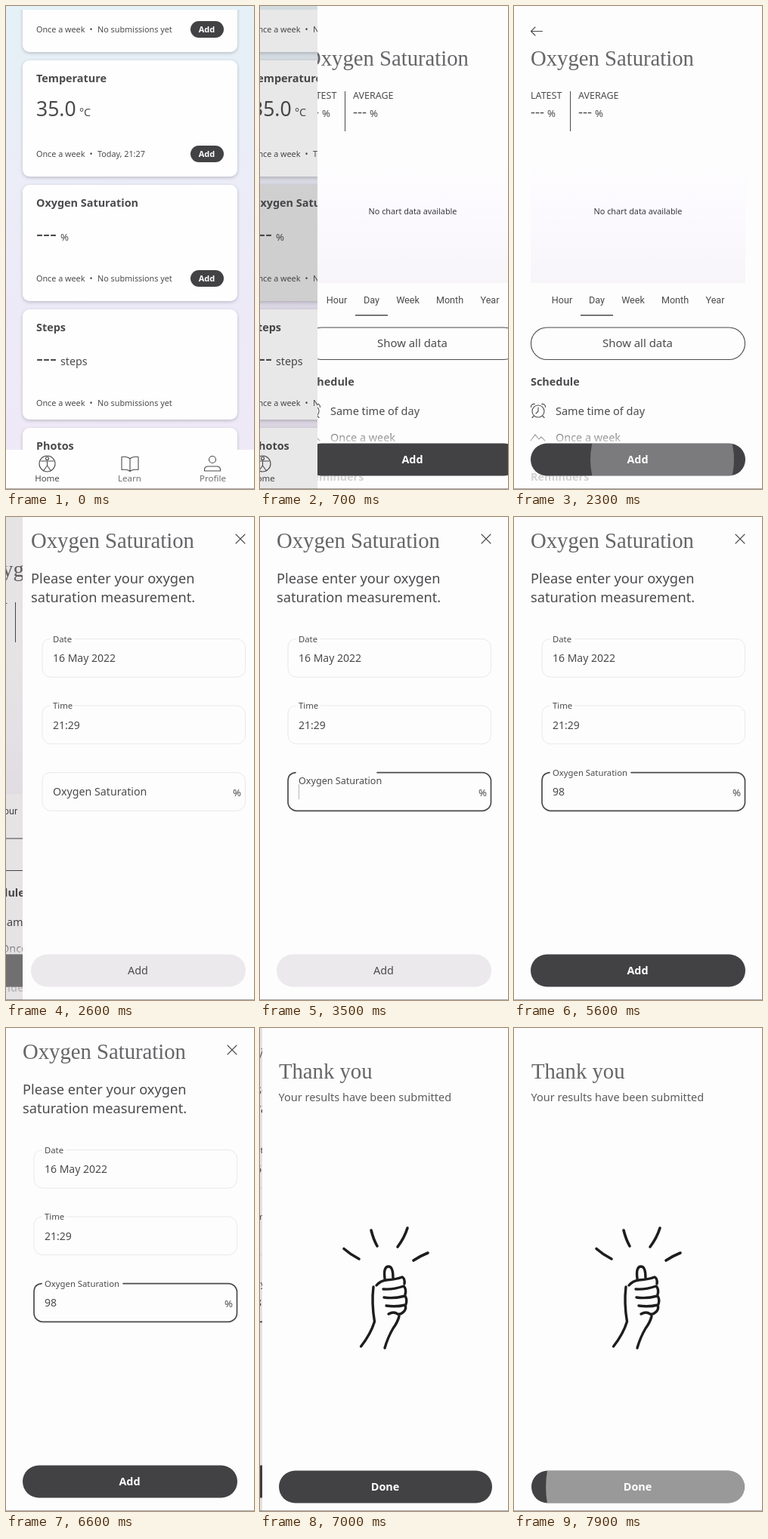
Animation of 328x640 px, one loop 8 s. Source, as an HTML page with a canvas:

```html
<!DOCTYPE html>
<html lang="en">
<head>
<meta charset="utf-8">
<title>Oxygen saturation entry</title>
<style>
  html, body { margin: 0; width: 100%; height: 100%; overflow: hidden; background: #fff; }
  canvas { display: block; width: 100vw; height: 100vh; }
</style>
</head>
<body>
<canvas></canvas>
<script>
const W = 328, H = 640, LOOP = 8000, STEP = 100;
const INK = '#4b4b4e', DARK = '#424245', TITLE = '#666568', PAGE = '#fdfdfd';
const SANS = '"Noto Sans", sans-serif', SERIF = '"Liberation Serif", serif', ROBOTO = 'Roboto, sans-serif';
const canvas = document.querySelector('canvas');
const ctx = canvas.getContext('2d');
const scale = window.devicePixelRatio || 1;
canvas.width = W * scale;
canvas.height = H * scale;

const clamp = v => Math.min(1, Math.max(0, v));
const easeOut = v => 1 - (1 - clamp(v)) ** 3;
const progress = (t, start, length) => clamp((t - start) / length);

function text(str, x, y, size, { color = INK, weight = 400, font = SANS, align = 'left' } = {}) {
  ctx.font = `${weight} ${size}px ${font}`;
  ctx.fillStyle = color;
  ctx.textAlign = align;
  ctx.fillText(str, x, y);
}

const title = (str, x, y) => text(str, x, y, 28.7, { font: SERIF, color: TITLE });

function rect(x, y, w, h, fill) {
  ctx.fillStyle = fill;
  ctx.fillRect(x, y, w, h);
}

function roundRect(x, y, w, h, r) {
  ctx.beginPath();
  ctx.roundRect(x, y, w, h, r);
}

function fillRound(x, y, w, h, r, fill) {
  roundRect(x, y, w, h, r);
  ctx.fillStyle = fill;
  ctx.fill();
}

function stroke(d, width = 1.1, color = INK) {
  ctx.lineWidth = width;
  ctx.strokeStyle = color;
  ctx.lineCap = ctx.lineJoin = 'round';
  ctx.stroke(new Path2D(d));
}

function gradient(y0, y1, ...colors) {
  const g = ctx.createLinearGradient(0, y0, 0, y1);
  colors.forEach((c, i) => g.addColorStop(i / (colors.length - 1), c));
  return g;
}

function scoped(draw) {
  ctx.save();
  draw();
  ctx.restore();
}

function button(x, y, w, h, label, ripple, { fill = DARK, color = '#fff', weight = 600 } = {}) {
  fillRound(x, y, w, h, h / 2, fill);
  if (ripple.r > 0 && ripple.alpha > 0) scoped(() => {
    roundRect(x, y, w, h, h / 2);
    ctx.clip();
    ctx.beginPath();
    ctx.arc(ripple.x, y + h / 2, ripple.r, 0, 7);
    ctx.fillStyle = `rgba(255,255,255,${ripple.alpha})`;
    ctx.fill();
  });
  text(label, 163.5, y + h / 2 + 4.9, 14.4, { color, weight, align: 'center' });
}

// Home list

function card(top, height, name, value, unit, note, canAdd, pressed) {
  scoped(() => {
    ctx.shadowColor = 'rgba(60,55,70,.28)';
    ctx.shadowBlur = 4 * scale;
    ctx.shadowOffsetY = 1.5 * scale;
    fillRound(22, top, 284, height, 9, '#fefefe');
  });
  if (pressed) fillRound(22, top, 284, height, 9, 'rgba(0,0,0,.11)');
  text(name, 40, top + 29, 14.4, { weight: 600 });
  if (!note) return;
  const isEmpty = value === '---';
  text(value, 40, top + 73.5, isEmpty ? 28 : 26.5, { weight: isEmpty ? 500 : 400 });
  text(unit, isEmpty ? 72 : 97, top + 73.5, unit === '%' ? 13.2 : 14.3);
  text('Once a week', 40, top + 128, 10.8);
  text('•', 112.5, top + 128, 10.8, { align: 'center' });
  text(note, 121, top + 128, 10.8);
  if (canAdd) {
    fillRound(244, top + 113, 44, 22, 11, DARK);
    text('Add', 265.5, top + 128, 11, { color: '#fff', weight: 600, align: 'center' });
  }
}

function home(t) {
  const none = 'No submissions yet';
  rect(0, 0, W, H, gradient(0, 590, '#e4f1f6', '#eaedf7', '#edeaf8', '#efe9f7'));
  scoped(() => {
    ctx.beginPath();
    ctx.rect(0, 5, W, H);
    ctx.clip();
    card(-93, 154, '', '', '', none, true);
  });
  card(72, 154, 'Temperature', '35.0', '°C', 'Today, 21:27', true);
  card(237, 154, 'Oxygen Saturation', '---', '%', none, true, t >= 500);
  card(402, 146, 'Steps', '---', 'steps', none, false);
  card(559, 146, 'Photos');
  rect(0, 588, W, 52, '#fefefe');
  stroke('M65 606.5a10.5 10.5 0 1 1-21 0a10.5 10.5 0 1 1 21 0M46 603h17M54.5 603v6l-5 7M54.5 609l5 7M52.5 599.5a2 2 0 1 1 4 0a2 2 0 1 1-4 0');
  stroke('M164 600c-3-3-7-3-11-2.500v17c4-.5 8-.5 11 2c3-2.500 7-2.500 11-2v-17c-4-.5-8-.5-11 2.500v16');
  stroke('M277.500 601a4.500 4.500 0 1 1-9 0a4.500 4.500 0 1 1 9 0M262.500 616v-1.500c0-3 2-4.500 5-4.500h11c3 0 5 1.500 5 4.500v1.500z');
  [['Home', 54.5], ['Learn', 163.5], ['Profile', 273.5]].forEach(([label, x], i) =>
    text(label, x, 630, 11.5, { align: 'center', color: i ? '#707073' : INK }));
}

// Measurement details

function detail(t) {
  rect(0, 0, W, H, PAGE);
  stroke('M37.500 33.500H22.500M28 28l-5.500 5.500l5.500 5.500');
  title('Oxygen Saturation', 22, 79);
  [['LATEST', 22], ['AVERAGE', 85]].forEach(([label, x]) => {
    text(label, x, 123, 12.5);
    text('---', x, 147, 18.6, { weight: 500 });
    text('%', x + 22, 147, 13.2);
  });
  rect(74, 113, 1, 53, INK);
  rect(22, 195, 284, 172, gradient(195, 367, '#fefdfd', '#fbf9fe', '#f8f5f9'));
  text('No chart data available', 164, 276, 10.8, { align: 'center', color: '#38383b' });
  [['Hour', 63.5], ['Day', 109.5], ['Week', 157.5], ['Month', 213], ['Year', 266]].forEach(([label, x]) =>
    text(label, x, 394, 12.6, { font: ROBOTO, align: 'center' }));
  rect(88, 409, 43, 1.5, INK);
  roundRect(22.5, 426, 283, 42.5, 21.2);
  ctx.lineWidth = 1.1;
  ctx.strokeStyle = INK;
  ctx.stroke();
  text('Show all data', 163.5, 452, 14.9, { align: 'center' });
  text('Schedule', 22, 503, 14.4, { weight: 600 });
  stroke('M40 537a8 8 0 1 1-16 0a8 8 0 1 1 16 0M32 532v5l-3 3M22.500 531.500c0-3 2-4.500 5-4M41.500 531.500c0-3-2-4.500-5-4M26 543.500l-2 2M38 543.500l2 2');
  text('Same time of day', 55, 542, 14.5);
  stroke('M22 576l6-8l5 6l3-3l5 5');
  text('Once a week', 55, 577, 14.4);
  text('Reminders', 22, 629, 14.4, { weight: 600 });
  rect(0, 560, W, 80, gradient(560, 580, 'rgba(253,253,253,0)', 'rgba(253,253,253,.76)'));
  button(22, 579.5, 284, 43, 'Add', { x: 196, r: t - 2205, alpha: .3 });
}

// Entry form

function field(top, label, value, { focused = false, float = 1, gap = 80 } = {}) {
  const bottom = top + 50.7, color = focused ? INK : '#ebe9eb';
  const start = float ? gap : 48;
  stroke(`M${start} ${top}H294a11.500 11.500 0 0 1 11.500 11.500V${bottom - 11.5}a11.500 11.500 0 0 1-11.500 11.500H48.500a11.500 11.500 0 0 1-11.500-11.500V${top + 11.5}q0-10.500 10-11.500`, focused ? 1.7 : 1, color);
  text(label, 51, top + 30 - 26 * float, 14.2 - 2.9 * float);
  text(value, 51, top + 30.5, 14);
}

function key(col, row, label, pressed) {
  const x = 4 + col * 81, y = 455 + row * 46;
  const isAction = col === 3, isDone = isAction && row === 3;
  fillRound(x, y + 1, 77, 40, 5, '#c3c2c9');
  fillRound(x, y, 77, 40, 5, isDone ? '#2374e1' : isAction ? '#cbcad2' : pressed ? '#e5e3e5' : '#fefefe');
  if (label) text(label, x + 38.5, y + 30, 27, { font: ROBOTO, align: 'center', color: '#1d1d20' });
}

function keyboard(t) {
  const shown = easeOut(progress(t, 3500, 400)) * (1 - progress(t, 5330, 270));
  if (!shown) return;
  ctx.translate(0, 191 * (1 - shown));
  rect(0, 449, W, 191, '#e9e8ee');
  const pressed = t === 4500 ? '9' : t === 4900 ? '8' : null;
  ['123', '456', '789', ',0.'].forEach((labels, row) => {
    [...labels].forEach((label, col) => key(col, row, label, label === pressed));
    key(3, row);
  });
  stroke('M281 475.500h9', 1.8, '#3b3b40');
  stroke('M276.500 520v4h18v-4', 1.6, '#3b3b40');
  stroke('M274.500 568l6-8h15v16h-15zM284 564.500l7 7M291 564.500l-7 7', 1.6, '#3b3b40');
  stroke('M278.500 614l4.500 4.500l10-10', 1.8, '#fff');
}

function form(t) {
  const focused = t >= 3500;
  const value = t >= 5000 ? '98' : t >= 4600 ? '9' : '';
  rect(0, 0, W, H, PAGE);
  title('Oxygen Saturation', 22, 41);
  stroke('M293 23l12 12M305 23l-12 12');
  text('Please enter your oxygen', 22, 88, 18.2);
  text('saturation measurement.', 22, 113, 18.2);
  field(161.5, 'Date', '16 May 2022');
  field(250, 'Time', '21:29');
  field(338.6, 'Oxygen Saturation', value, { focused, gap: 155, float: focused ? progress(t, 3395, 190) : 0 });
  text('%', 289, 370, 13.2);
  const caretOn = focused && t < 5500 || t >= 6000 && t < 6500;
  if (caretOn) rect(51 + value.length * 7.8, 354, 1, 20, '#b8b6b9');
  if (value) {
    button(22, 579.5, 284, 43, 'Add', { x: 170, r: t - 6105, alpha: .35 * (1 - progress(t, 6350, 250)) });
  } else {
    button(22, 579.5, 284, 43, 'Add', {}, { fill: '#ebe9eb', color: INK, weight: 500 });
  }
  rect(0, 639, W, 1, '#a9a8aa');
  scoped(() => keyboard(t));
}

// Confirmation

function thanks(t) {
  rect(0, 0, W, H, PAGE);
  title('Thank you', 23, 67);
  text('Your results have been submitted', 22.5, 97, 14.5, { color: '#5c5b5e' });
  const ink = '#1d1d1d';
  stroke('M109 292.500q9 8 20 13.500M145 268q3 12 8 21M193 265q-4 13-13 25M220 298q-10 4-19 10', 3.6, ink);
  stroke('M163 332q-2-16 5-16q6 0 6 15', 3.4, ink);
  stroke('M152 341q5-6 13-7q14-1 21-4q4 2 3 9M148 343c-2 16-1 31 1.500 46c-4 13-11 24-18 33', 3.4, ink);
  stroke('M161 346q13 1 27-4q4 4 2 11M162 357q13 2 28-2q3 5 1 11M165 368q13 2 25-1q2 5-2 9q-4 4-8 3q-5-4-12 0', 3.4, ink);
  stroke('M182 382q-2 8-8 16q-7 12-11 26', 3.4, ink);
  button(23, 586.5, 282, 43, 'Done', { x: 173.5, r: .71 * (t - 7715), alpha: .46 });
}

// Each page is revealed from the right edge, with the page below drifting left.
const pages = [
  { draw: home, start: -1000 },
  { draw: detail, start: 515 },
  { draw: form, start: 2315 },
  { draw: thanks, start: 6615 },
];
const reveal = (page, t) => page ? easeOut(progress(t, page.start, 480)) : 0;

function render(t) {
  ctx.setTransform(scale, 0, 0, scale, 0, 0);
  pages.forEach((page, i) => {
    const shown = reveal(page, t), covered = reveal(pages[i + 1], t);
    if (!shown || covered === 1) return;
    scoped(() => {
      const edge = Math.round(W * (1 - shown));
      ctx.beginPath();
      ctx.rect(edge, 0, W, H);
      ctx.clip();
      ctx.translate(Math.round(edge / 2 - 66 * covered), 0);
      page.draw(t);
      if (page.draw !== form) rect(0, 639, W, 1, '#a9a8aa');
      if (covered) rect(0, 0, W + 66, H, `rgba(20,0,10,${.11 * covered})`);
    });
  });
}

function tick(now) {
  render(Math.floor(now % LOOP / STEP) * STEP);
  requestAnimationFrame(tick);
}
tick(performance.now());
</script>
</body>
</html>
```
